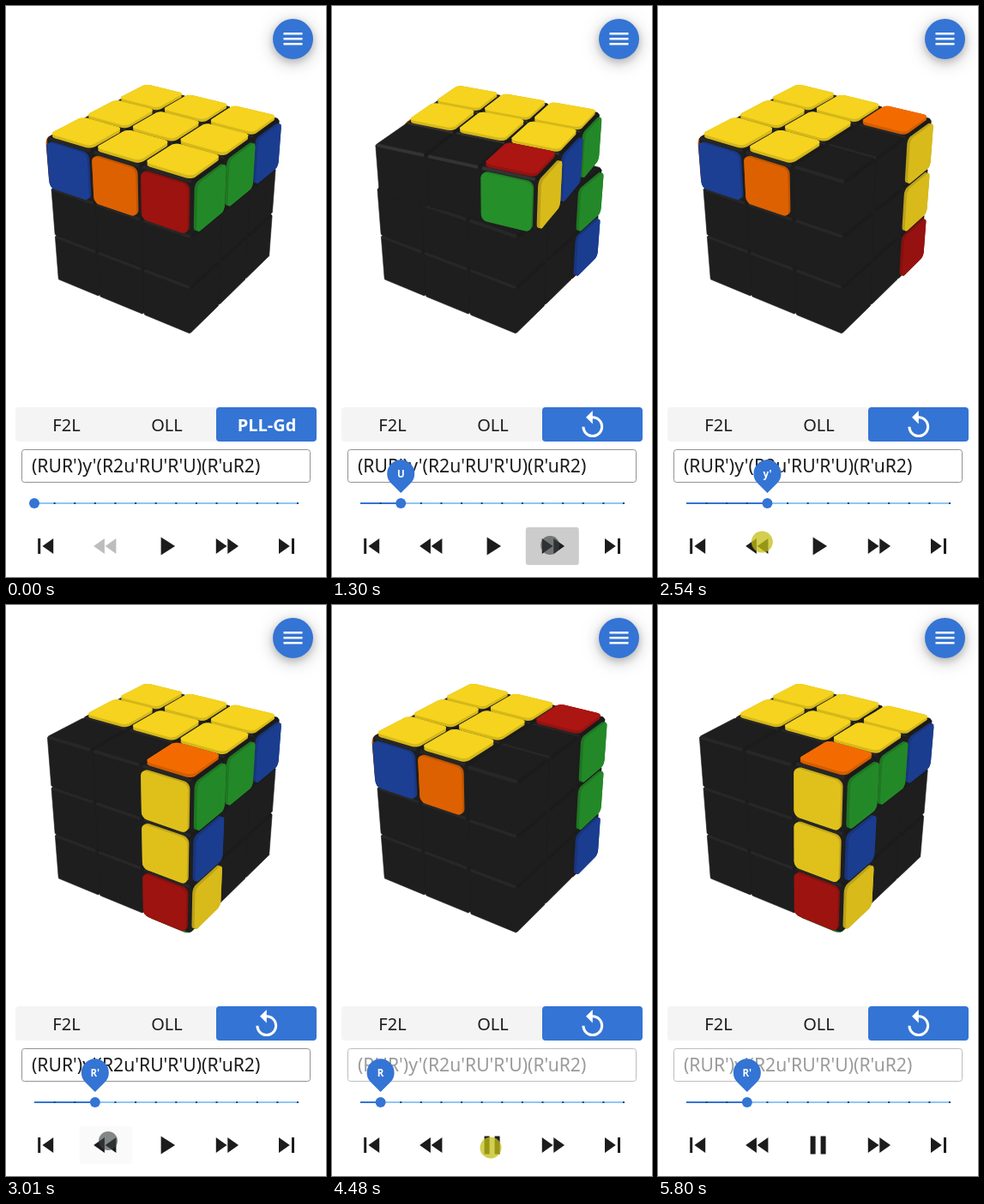
Animation of 373 by 666 pixels, one loop 5.86 s. Source, as an HTML page:

```html
<!DOCTYPE html>
<html lang="en">
<head>
<meta charset="utf-8">
<title>Cube trainer</title>
<style>
  html, body { margin: 0; width: 100%; height: 100%; overflow: hidden; background: #fff; }
  svg { display: block; width: 373px; height: 666px; font-family: "Noto Sans", "Open Sans", sans-serif; }
  .fab {
    filter: drop-shadow(0 3px 5px rgba(0, 0, 0, .2)) drop-shadow(0 5px 10px rgba(0, 0, 0, .14))
      drop-shadow(0 1px 12px rgba(0, 0, 0, .08));
  }
</style>
</head>
<body>
<svg viewBox="0 0 373 666">
  <rect width="373" height="666" fill="#fff"/>
  <g id="cube" stroke-linejoin="round"></g>

  <circle class="fab" cx="334.5" cy="38.5" r="23.5" fill="#3474d4"/>
  <path d="M323.5 32.2h22M323.5 38.2h22M323.5 44.2h22" stroke="#fff" stroke-width="2.4"/>

  <rect x="11" y="468" width="240" height="40" rx="4" fill="#f4f4f4"/>
  <rect x="245" y="468" width="117" height="40" rx="4" fill="#3474d4"/>
  <g font-size="20" text-anchor="middle" fill="#1c1c1c">
    <text x="70.5" y="496">F2L</text>
    <text x="187.5" y="496">OLL</text>
    <text id="tabName" x="304" y="496" fill="#fff" font-weight="600">PLL-Gd</text>
  </g>
  <path id="reset" transform="translate(285.2 470.5) scale(1.55)" fill="#fff"
    d="M12 5V1L7 6l5 5V7c3.31 0 6 2.69 6 6s-2.69 6-6 6-6-2.69-6-6H4c0 4.42 3.58 8 8 8s8-3.58 8-8-3.58-8-8-8z"/>
  <circle id="ripple" cx="301.5" cy="498" fill="#fff"/>

  <rect id="box" x="18.5" y="517.5" width="336" height="38" rx="3" fill="none"/>
  <text id="formula" x="30" y="544" font-size="21.15">(RUR')y'(R2u'RU'R'U)(R'uR2)</text>

  <path d="M33 580H340" stroke="#8fc6f7" stroke-width="2"/>
  <path id="track" stroke="#3474d4" stroke-width="2"/>
  <g id="marks" fill="#23466f"></g>
  <g id="thumb">
    <circle cy="580" r="6" fill="#3474d4"/>
    <g id="balloon">
      <path d="M0 0L-11.3 -11.3A16 16 0 1 1 11.3 -11.3Z" fill="#3474d4"/>
      <text id="label" y="-18" font-size="11.5" font-weight="600" text-anchor="middle" fill="#fff"></text>
    </g>
  </g>

  <g id="buttons"></g>
  <circle id="pointer"/>
</svg>
<script>
const $ = id => document.getElementById(id);
const LOOP = 5860;
const clamp = v => Math.min(1, Math.max(0, v));
const mix = (a, b, k) => a + (b - a) * k;
const rgb = c => `rgb(${c.map(Math.round)})`;

// cubic-bezier(.4, 0, .2, 1)
function ease(t) {
  t = clamp(t);
  let lo = 0, hi = 1, s = t;
  for (let i = 0; i < 18; i++) {
    s = (lo + hi) / 2;
    const r = 1 - s;
    if (1.2 * r * r * s + .6 * r * s * s + s * s * s < t) lo = s; else hi = s;
  }
  return s * s * (3 - 2 * s);
}

// ---- Cube model ----
const COLORS = {
  y: [245, 211, 30], o: [243, 107, 0], r: [171, 21, 18], g: [40, 156, 45], b: [31, 69, 163]
};
const MOVES = [
  { name: "R", axis: 0, layers: [1], dir: -1 },
  { name: "U", axis: 1, layers: [1], dir: -1 },
  { name: "R'", axis: 0, layers: [1], dir: 1 },
  { name: "y'", axis: 1, layers: [-1, 0, 1], dir: 1 }
];
const FACES = [0, 1, 2].flatMap(axis => [-1, 1].map(sign => ({ axis, sign })));

function rotate(v, axis, angle) {
  const c = Math.cos(angle), s = Math.sin(angle), i = (axis + 1) % 3, j = (axis + 2) % 3, w = [...v];
  w[i] = v[i] * c - v[j] * s;
  w[j] = v[i] * s + v[j] * c;
  return w;
}
const normal = f => [0, 1, 2].map(i => i === f.axis ? f.sign : 0);
const dot = (a, b) => a[0] * b[0] + a[1] * b[1] + a[2] * b[2];

function solvedTop() {
  const cubies = [];
  for (let x = -1; x <= 1; x++) for (let y = -1; y <= 1; y++) for (let z = -1; z <= 1; z++) {
    const stickers = {};
    const put = (n, c) => { stickers[n] = COLORS[c]; };
    if (y === 1) {
      put([0, 1, 0], "y");
      if (z === 1) put([0, 0, 1], "bor"[x + 1]);
      if (z === -1) put([0, 0, -1], "gbr"[x + 1]);
      if (x === 1) put([1, 0, 0], "bgg"[z + 1]);
      if (x === -1) put([-1, 0, 0], "oro"[z + 1]);
    }
    cubies.push({ pos: [x, y, z], stickers });
  }
  return cubies;
}

function applyMove(cubies, { axis, layers, dir }) {
  const turn = v => rotate(v, axis, dir * Math.PI / 2).map(n => Math.round(n) + 0);
  return cubies.map(c => {
    if (!layers.includes(c.pos[axis])) return c;
    const stickers = {};
    for (const n in c.stickers) stickers[turn(n.split(",").map(Number))] = c.stickers[n];
    return { pos: turn(c.pos), stickers };
  });
}
const states = [solvedTop()];
MOVES.forEach((m, i) => states.push(applyMove(states[i], m)));

// ---- Camera ----
const DIST = 15, FOCAL = 937;
const unit = v => v.map(n => n / Math.hypot(...v));
const toCam = unit([2, 2, 3]), right = unit([3, 0, -2]);
const up = [
  toCam[1] * right[2] - toCam[2] * right[1],
  toCam[2] * right[0] - toCam[0] * right[2],
  toCam[0] * right[1] - toCam[1] * right[0]
];
const eye = toCam.map(n => n * DIST);

function project(p) {
  const k = FOCAL / (DIST - dot(p, toCam));
  return [186.5 + k * dot(p, right), 227.7 - k * dot(p, up)];
}

function hull(points) {
  const pts = [...points].sort((a, b) => a[0] - b[0] || a[1] - b[1]);
  const chain = list => {
    const out = [];
    for (const p of list) {
      while (out.length > 1) {
        const [a, b] = out.slice(-2);
        if ((b[0] - a[0]) * (p[1] - a[1]) > (b[1] - a[1]) * (p[0] - a[0])) break;
        out.pop();
      }
      out.push(p);
    }
    return out.slice(0, -1);
  };
  return [...chain(pts), ...chain(pts.reverse())];
}

const shape = (pts, fill, line = 0) =>
  `<path d="M${pts.map(p => p.map(n => n.toFixed(2))).join("L")}Z" fill="${fill}"` +
  (line ? ` stroke="${fill}" stroke-width="${line}"/>` : "/>");

const HALF = .5, INSET = .46, STICKER = .45, RADIUS = .11, RAISE = .055;
const square = [[-1, -1], [1, -1], [1, 1], [-1, 1]].map(p => p.map(n => n * INSET));
const rounded = [0, 1, 2, 3].flatMap(q => [0, 1, 2, 3, 4].map(i => {
  const mid = (q + .5) * Math.PI / 2, a = (q + i / 4) * Math.PI / 2, c = STICKER - RADIUS;
  return [c * Math.sign(Math.cos(mid)) + RADIUS * Math.cos(a), c * Math.sign(Math.sin(mid)) + RADIUS * Math.sin(a)];
}));

function drawCubie(cubie, place) {
  const outline = (f, height, pts) => pts.map(([a, b]) => {
    const p = [...cubie.pos];
    p[f.axis] += f.sign * height;
    p[(f.axis + 1) % 3] += a;
    p[(f.axis + 2) % 3] += b;
    return project(place(p));
  });
  const faces = FACES.map(f => {
    const n = normal(f), world = place(n);
    const center = place(cubie.pos.map((v, i) => v + n[i] * HALF));
    const visible = dot(world, eye.map((v, i) => v - center[i])) > 0;
    return { ...f, n, world, visible, color: cubie.stickers[n] };
  });
  const sticker = f => {
    const light = .85 + [.03, .15, .06].reduce((s, w, i) => s + w * Math.max(0, f.world[i]), 0);
    const color = f.color.map(v => v * light);
    const top = outline(f, HALF + RAISE, rounded);
    const side = hull([...outline(f, HALF, rounded), ...top]);
    return shape(side, rgb(color.map(v => v * .87))) + (f.visible ? shape(top, rgb(color)) : "");
  };
  const colored = faces.filter(f => f.color);
  let out = colored.filter(f => !f.visible).map(sticker).join("");
  out += shape(hull(faces.flatMap(f => outline(f, HALF, square))), "#1e1e1e", .6);

  // lit bevel between an upward face and each side face
  const roof = faces.find(f => f.world[1] > .9);
  if (roof) for (const f of faces) {
    if (!f.visible || f.axis === roof.axis) continue;
    const facing = Math.max(0, (f.world[0] * 2 + f.world[2] * 3) / Math.sqrt(13));
    const third = 3 - f.axis - roof.axis;
    const edge = (outer, inner, end) => {
      const p = [...cubie.pos];
      p[f.axis] += f.sign * outer;
      p[roof.axis] += roof.sign * inner;
      p[third] += end * INSET;
      return project(place(p));
    };
    const gray = 26 + 58 * facing ** 8;
    out += shape([edge(HALF, INSET, -1), edge(HALF, INSET, 1), edge(INSET, HALF, 1), edge(INSET, HALF, -1)],
      rgb([gray, gray, gray]));
  }
  return out + colored.filter(f => f.visible).map(sticker).join("");
}

function drawCube(cubies, move, amount) {
  const angle = move.dir * amount * Math.PI / 2;
  $("cube").innerHTML = cubies.map(c => {
    const moving = move.layers.includes(c.pos[move.axis]);
    const place = v => moving ? rotate(v, move.axis, angle) : v;
    return { c, place, slab: c.pos[move.axis], near: dot(place(c.pos), toCam) };
  }).sort((a, b) => a.slab - b.slab || a.near - b.near)
    .map(o => drawCubie(o.c, o.place)).join("");
}

// ---- Controls ----
const ICONS = {
  first: "M6 6h2v12H6zm3.5 6l8.5 6V6z",
  back: "M11 18V6l-8.5 6 8.5 6zm.5-6l8.5 6V6l-8.5 6z",
  play: "M8 5v14l11-7z",
  next: "M4 18l8.5-6L4 6v12zm9-12v12l8.5-6L13 6z",
  last: "M6 18l8.5-6L6 6v12zM16 6v12h2V6h-2z"
};
const PAUSE = "M6 19h4V5H6v14zm8-14v14h4V5h-4z";
$("buttons").innerHTML = Object.keys(ICONS).map((name, i) => {
  const x = 46.2 + 70.2 * i;
  return `<rect id="${name}Bg" x="${x - 31}" y="608" width="62" height="44" rx="3" fill="#000" opacity="0"/>` +
    `<path id="${name}" transform="translate(${x - 18} 612) scale(1.5)" d="${ICONS[name]}" fill="#1c1c1c"/>`;
}).join("");

const stepX = n => 33 + n * 307 / 13;
$("marks").innerHTML = Array.from({ length: 13 }, (_, i) =>
  `<rect x="${stepX(i + 1) - 1}" y="579" width="2" height="2"/>`).join("");

// ---- Timeline ----
const TURN = 275, SLIDE = 150, PLAY_AT = 4235;
const EVENTS = [[-999, 0], [570, 1], [1122, 2], [1500, 3], [1947, 4], [2690, 3], [3725, 0],
  [PLAY_AT, 1], [4904, 2], [5567, 3]];
const PRESSES = [["next", 450, 570], ["next", 960, 1090], ["next", 1130, 1480], ["next", 1800, 1930],
  ["back", 2560, 2690], ["back", 2965, 3080], ["tab", 3640, 3850], ["play", 4140, 4235], ["", 4950, 5400]];
const PATH = [[70, 275, 682], [280, 255, 629], [2250, 254, 629], [2600, 119, 625], [3200, 119, 625],
  [3600, 301.5, 502], [3920, 301.5, 502], [4140, 185, 633], [5020, 185, 633], [5300, 182, 684]];

function pressure(name, t) {
  return Math.max(...PRESSES.filter(p => p[0] === name)
    .map(([, a, b]) => clamp((t - a) / 150) * clamp(1 - (t - b) / 90)));
}

function drawPointer(t) {
  let i = PATH.findIndex(p => p[0] > t);
  if (i < 0) i = PATH.length;
  const a = PATH[Math.max(0, i - 1)], b = PATH[Math.min(PATH.length - 1, i)];
  const k = ease((t - a[0]) / (b[0] - a[0] || 1));
  const held = PRESSES.some(p => t >= p[1] && t < p[2]);
  const p = $("pointer");
  p.setAttribute("cx", mix(a[1], b[1], k));
  p.setAttribute("cy", mix(a[2], b[2], k));
  p.setAttribute("r", held ? 11 : 12.5);
  p.setAttribute("fill", held ? "#3c4141" : "#c3bd14");
  p.setAttribute("opacity", t > 4950 ? .18 : held ? .62 : .75);
}

function render(t) {
  let i = EVENTS.length - 1;
  while (EVENTS[i][0] > t) i--;
  const [at, step] = EVENTS[i], prev = i ? EVENTS[i - 1][1] : 0;
  const slide = ease((t - at) / SLIDE), turn = ease((t - at) / TURN);

  const base = Math.min(prev, step);
  if (step === 0) drawCube(states[0], MOVES[0], 0);
  else drawCube(states[base], MOVES[base], step > prev ? turn : 1 - turn);

  const x = mix(stepX(prev), stepX(step), slide);
  const started = mix(Math.min(prev, 1), Math.min(step, 1), slide);
  const scale = step ? started : started ** 1.3;
  $("track").setAttribute("d", `M33 580H${x}`);
  $("thumb").setAttribute("transform", `translate(${x} 0)`);
  $("balloon").setAttribute("transform", `translate(0 ${578 - 10 * scale}) scale(${scale})`);
  $("balloon").setAttribute("opacity", scale);
  $("label").textContent = step ? MOVES[step - 1].name : "";

  $("tabName").setAttribute("visibility", step ? "hidden" : "visible");
  $("reset").setAttribute("visibility", step ? "visible" : "hidden");
  const gray = mix(189, 28, started);
  $("back").setAttribute("fill", rgb([gray, gray, gray]));

  const playing = t >= PLAY_AT;
  $("play").setAttribute("d", playing ? PAUSE : ICONS.play);
  $("formula").setAttribute("fill", playing ? "#9b9b9b" : "#1c1c1c");
  $("box").setAttribute("stroke", playing ? "#bdbdbd" : "#929292");

  for (const name of ["next", "back", "play"])
    $(name + "Bg").setAttribute("opacity", .2 * pressure(name, t) ** 2);
  const ripple = pressure("tab", t);
  $("ripple").setAttribute("r", 30 * ripple);
  $("ripple").setAttribute("opacity", .2 * ripple);
  drawPointer(t);
}

const start = performance.now();
function tick() {
  render((performance.now() - start) % LOOP);
  requestAnimationFrame(tick);
}
tick();
</script>
</body>
</html>
```
